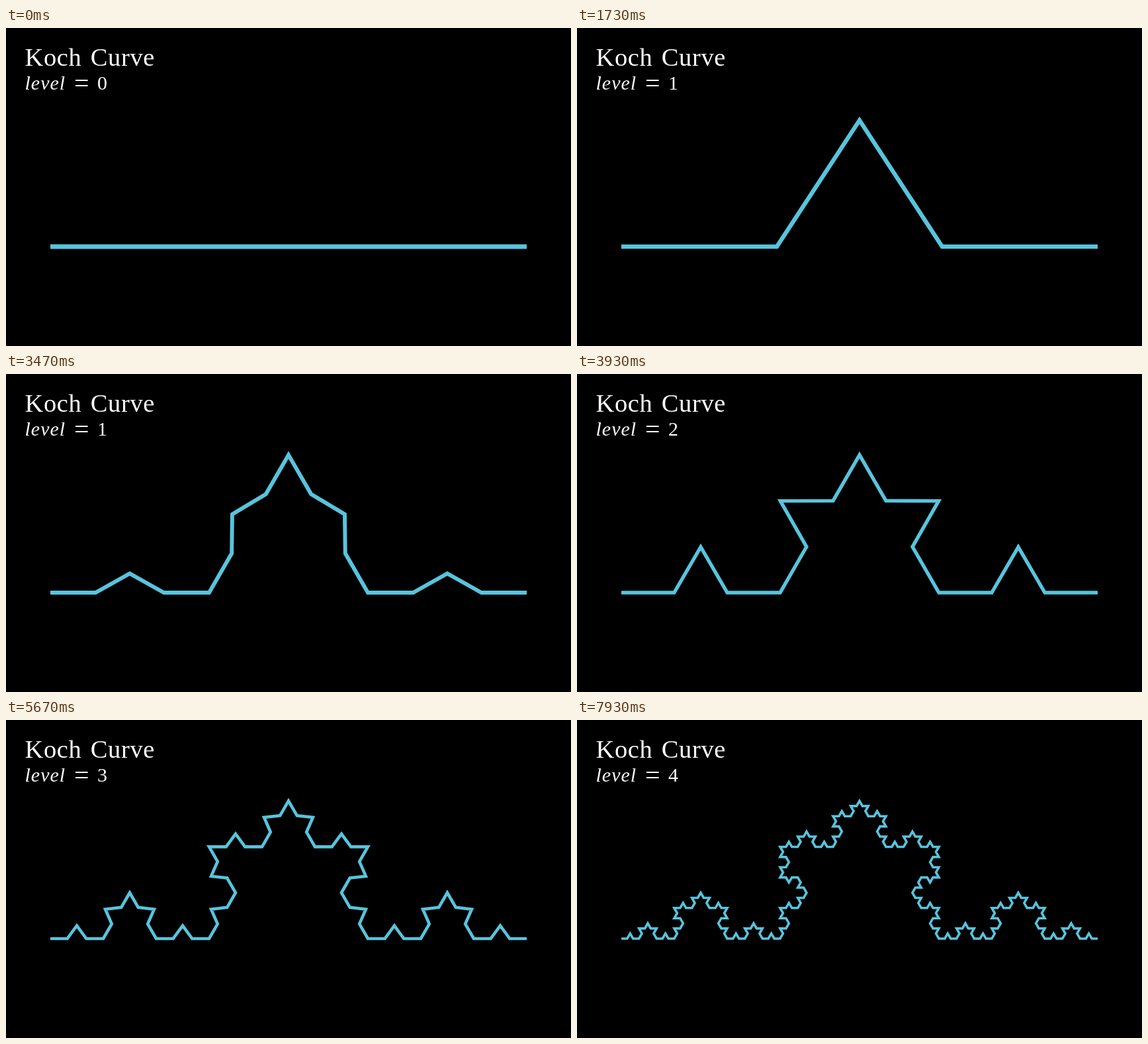
These frames come from a looping animation (854x480 px, 8000 ms). An HTML page:

```html
<!DOCTYPE html>
<html lang="en">
<meta charset="utf-8">
<title>Koch Curve</title>
<style>
  html, body { margin: 0; height: 100%; overflow: hidden; background: #000; }
  svg { display: block; width: 854px; height: 480px; }
  text { fill: #fff; font-family: "Liberation Serif", serif; font-size: 30px; }
  #title { font-size: 38.5px; letter-spacing: .65px; word-spacing: 3px; }
  #label { font-style: italic; letter-spacing: 1px; }
  #equals { font-size: 40px; }
  #curve { fill: none; stroke: #58c4dd; stroke-miterlimit: 10; }
</style>
<svg viewBox="0 0 854 480">
  <text id="title" x="28.5" y="57">Koch Curve</text>
  <text id="label" x="28.5" y="93">level</text>
  <text id="equals" x="103" y="97">=</text>
  <text id="digit" x="138" y="93">0</text>
  <polyline id="curve"/>
</svg>
<script>
const FPS = 15, LOOP = 8000, CYCLE = 30, HOLD = 15;
const curve = document.getElementById('curve');
const digit = document.getElementById('digit');

const sigmoid = x => 1 / (1 + Math.exp(-x));
const smooth = t => {
  const tail = sigmoid(-5);
  return Math.min(1, Math.max(0, (sigmoid(10 * t - 5) - tail) / (1 - 2 * tail)));
};

// Grow a bump on every segment; amount 0 is flat, 1 is a full Koch step.
function refine(points, amount) {
  const side = 1 / 4 + amount / 12;
  const height = amount * Math.sqrt(3) / 6;
  const result = [points[0]];
  for (let i = 1; i < points.length; i++) {
    const [x, y] = points[i - 1];
    const dx = points[i][0] - x, dy = points[i][1] - y;
    const at = (along, up) => [x + dx * along + dy * up, y + dy * along - dx * up];
    result.push(at(side, 0), at(.5, height), at(1 - side, 0), points[i]);
  }
  return result;
}

function draw(now) {
  // Frame starts are rounded to 10 ms, hence the small offset.
  const frame = Math.floor((now % LOOP + 3.4) * FPS / 1000) % (LOOP * FPS / 1000);
  const level = Math.floor(frame / CYCLE);
  const amount = smooth(Math.max(0, frame % CYCLE - HOLD) / FPS);

  let points = [[67, 330], [787, 330]];
  for (let i = 0; i < level; i++) points = refine(points, 1);
  points = refine(points, amount);

  curve.setAttribute('points', points.map(p => p.map(v => v.toFixed(2))).join(' '));
  curve.setAttribute('stroke-width', 7.2 - 0.9 * (level + amount));
  digit.textContent = Math.round(level + amount);
}

const start = performance.now();
function tick() {
  draw(performance.now() - start);
  requestAnimationFrame(tick);
}
tick();
</script>
</html>
```
